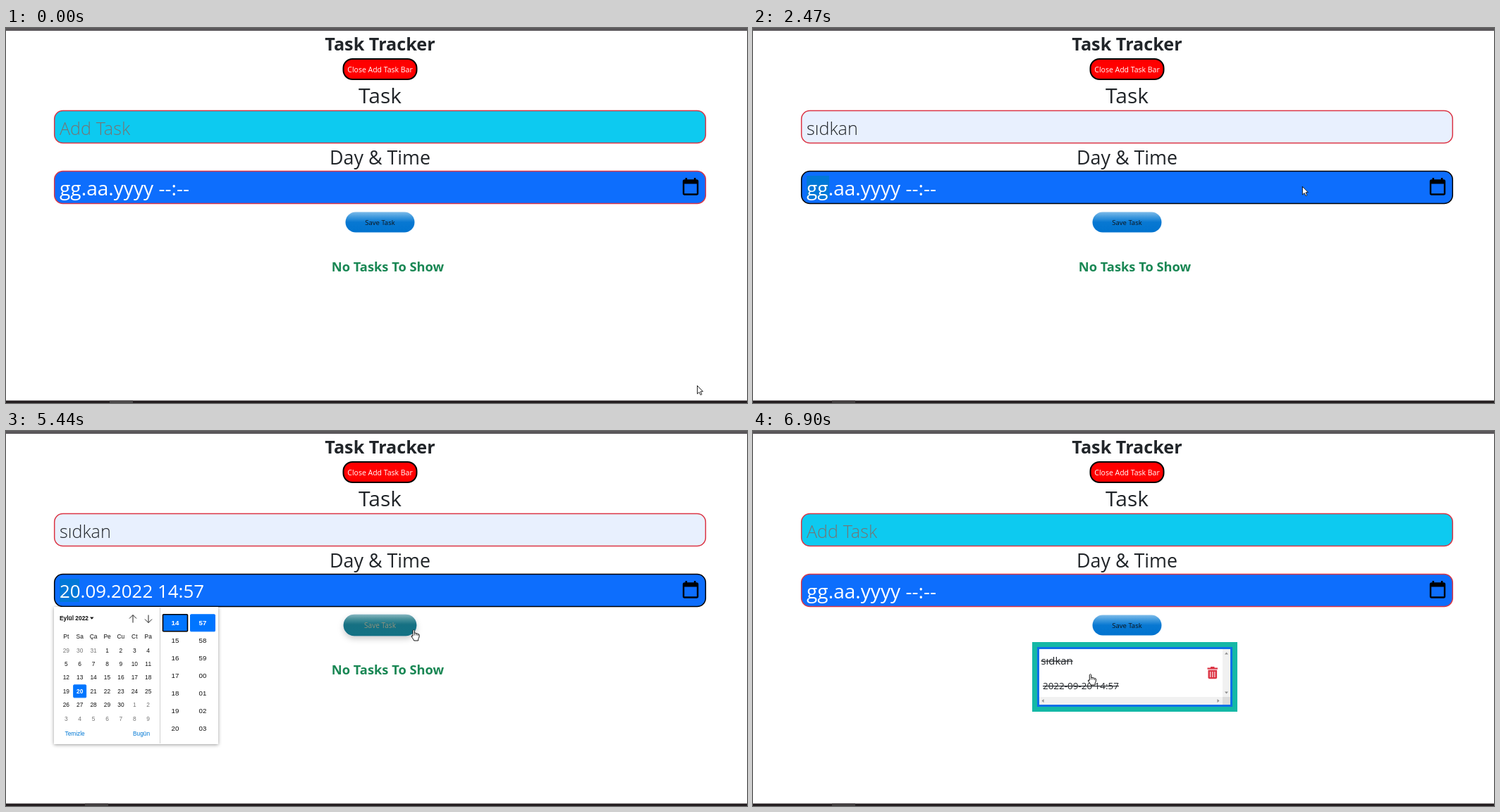
Write an HTML page with a canvas that moves like this. It is 1051 by 533 pixels and loops after 8 s.

```html
<!DOCTYPE html>
<html lang="tr">
<head>
<meta charset="utf-8">
<title>Task Tracker</title>
<style>
html, body { margin: 0; width: 100%; height: 100%; overflow: hidden; background: #fff; }
canvas { display: block; }
</style>
</head>
<body>
<canvas id="stage" width="1051" height="533"></canvas>
<script>
const c = document.getElementById('stage').getContext('2d');
const LOOP = 8000, MID = 530.5;
const SANS = '"Open Sans", "Noto Sans", sans-serif', ARIAL = '"Liberation Sans", Arial, sans-serif';
const INK = '#212529', RED = '#dc3545', BLUE = '#0d6efd';
const NAME = 'sıdkan';

// Bursts of movement: start, end, number of steps
const bursts = [[70, 860, 12], [1120, 1920, 12], [2000, 2740, 12], [2820, 2890, 2],
  [3290, 4090, 13], [4160, 4900, 12], [4980, 5710, 12], [6340, 6690, 6]];

// Pointer path: time, x, y
const path = [[70, 980, 508], [500, 640, 210], [715, 440, 105], [860, 369, 128],
  [1120, 369, 128], [1260, 222, 142], [1411, 179, 175], [1600, 158, 186],
  [2000, 158, 188], [2250, 460, 234], [2471, 779, 225], [2740, 996, 215],
  [2820, 992, 222], [2890, 981, 233], [3290, 979, 236], [3690, 346, 272],
  [4090, 193, 313], [4160, 188, 316], [4430, 106, 364], [4530, 106, 364],
  [4760, 240, 268], [4900, 286, 275], [4980, 292, 275], [5445, 578, 282],
  [5710, 547, 291], [6340, 547, 291], [6690, 478, 345]];

const between = (t, a, b) => t >= a && t < b;
const clamp = x => Math.max(0, Math.min(1, x));

function stepped(t) {
  for (const [a, b, n] of bursts) {
    if (t < a || t > b) continue;
    const d = (b - a) / (n - 1);
    return Math.min(b, a + Math.floor((t - a) / d + 0.3) * d);
  }
  return t;
}

function pointerAt(t) {
  const i = path.findIndex(p => p[0] > t);
  if (i === 0) return path[0].slice(1);
  if (i < 0) return path[path.length - 1].slice(1);
  const [a, x, y] = path[i - 1], [b, u, v] = path[i], k = (t - a) / (b - a);
  return [x + (u - x) * k, y + (v - y) * k];
}

function rect(x, y, w, h, color) {
  c.fillStyle = color;
  c.fillRect(x, y, w, h);
}

function round(x, y, w, h, r, fill, stroke, line = 1.5) {
  c.beginPath();
  c.roundRect(x, y, w, h, r);
  if (fill) { c.fillStyle = fill; c.fill(); }
  if (stroke) { c.strokeStyle = stroke; c.lineWidth = line; c.stroke(); }
}

function poly(points, fill, stroke, line = 1) {
  c.beginPath();
  for (let i = 0; i < points.length; i += 2) c.lineTo(points[i], points[i + 1]);
  if (fill) { c.closePath(); c.fillStyle = fill; c.fill(); }
  if (stroke) { c.strokeStyle = stroke; c.lineWidth = line; c.stroke(); }
}

function text(s, x, y, size, color, { weight = 400, align = 'left', family = SANS } = {}) {
  c.font = `${weight} ${size}px ${family}`;
  c.textAlign = align;
  c.fillStyle = color;
  c.fillText(s, x, y);
  return c.measureText(s).width;
}

function page(t) {
  rect(0, 0, 1051, 533, '#fff');
  rect(0, 0, 1051, 4, '#5a575a');
  rect(0, 529.5, 1051, 3.5, '#241e20');
  if (t < 790) rect(147, 529.5, 33, 3.5, '#4b4849');
  else rect(112, 529.5, 33, 3.5, '#413d3e');

  const mid = { align: 'center' }, bold = { align: 'center', weight: 700 };
  text('Task Tracker', MID, 32, 25.2, INK, bold);
  round(478.5, 44, 104, 29, 13, '#f00', '#000', 2);
  text('Close Add Task Bar', MID, 62.5, 10.5, '#fff', mid);
  text('Task', MID, 107, 30, INK, mid);
  text('Day & Time', MID, 194, 26.8, INK, mid);
  if (t < 5790) text('No Tasks To Show', 541.5, 345.5, 18.3, '#198754', bold);
}

function taskField(t) {
  const filled = between(t, 1470, 5790);
  const focus = between(t, 780, 2300);
  round(68.7, 117.5, 923.6, 46, 12, filled ? '#e8f0fe' : '#0dcaf0', focus ? '#000' : RED);
  text(filled ? NAME : 'Add Task', 76, 151.5, 25.2, filled ? INK : '#757575', { weight: 300 });
}

function dateField(t) {
  const focus = between(t, 2300, 5790), chosen = between(t, 4430, 5790);
  round(68.7, 203.5, 923.6, 46, 12, BLUE, focus ? '#000' : RED);
  if (focus) rect(76, 210, chosen ? 28 : 32, 33, '#0178d7');
  if (chosen) text('20.09.2022 14:57', 76, 237, 25.9, '#fff');
  else text('gg.aa.yyyy --:--', 76, 238, 28, '#fff');
  round(961, 216.5, 20, 20, 1.5, null, '#000', 2.4);
  rect(961, 216, 20, 5.5, '#000');
  rect(963.5, 213, 2.6, 4, '#000');
  rect(975.8, 213, 2.6, 4, '#000');
}

function pill(stops) {
  const g = c.createLinearGradient(0, -14.5, 0, 14.5);
  stops.forEach(([at, color]) => g.addColorStop(at, color));
  round(-49, -14.5, 98, 29, 14.5, g);
}

function saveButton(t) {
  const hover = clamp((t - 5300) / 250) - clamp((t - 6400) / 250);
  const scale = 1 + 0.1 * hover;
  c.save();
  c.translate(MID, 276);
  c.scale(scale, scale);
  c.shadowColor = `rgba(0,0,0,${0.35 * hover})`;
  c.shadowBlur = 9;
  c.shadowOffsetY = 4;
  pill([[0, '#7dbbe9'], [0.25, '#3d98dd'], [0.5, '#0878d2'], [1, '#0073cf']]);
  c.shadowColor = 'transparent';
  c.globalAlpha = hover;
  pill([[0, '#8fb3a1'], [0.2, '#4f8a6c'], [0.45, '#1f6a49'], [1, '#22714d']]);
  c.globalAlpha = 1;
  const mix = (a, b) => a + (b - a) * hover;
  text('Save Task', 0, 3.6, 9.5, `rgb(${mix(16, 240)},${mix(20, 240)},${mix(24, 200)})`, { align: 'center' });
  c.restore();
}

function suggestions(t) {
  if (!between(t, 1255, 1850)) return;
  c.save();
  c.shadowColor = 'rgba(0,0,0,.35)';
  c.shadowBlur = 3;
  c.shadowOffsetY = 1;
  round(137, 170, 58, 155, 3, '#292a2d');
  c.restore();
  poly([145.5, 170.5, 151.5, 164.5, 157.5, 170.5], '#292a2d');
  if (t >= 1470) rect(137, 173, 58, 25, '#3f4043');
  [NAME, 'asd', 'demhan', 'react', 'asda', 'asdasd'].forEach((s, i) =>
    text(s, 145, 188.3 + 25 * i, 8.4, '#fff'));
}

function cell(s, x, y, size, color, weight) {
  text(s, x, y + size * 0.36, size, color, { weight, align: 'center', family: ARIAL });
}

function picker(t) {
  if (!between(t, 3150, 5790)) return;
  const arial = { family: ARIAL };
  c.save();
  c.shadowColor = 'rgba(0,0,0,.4)';
  c.shadowBlur = 5;
  c.shadowOffsetY = 1;
  rect(68, 250, 233, 195, '#fff');
  c.restore();
  rect(218, 251, 1, 193, '#d0d0d0');

  text('Eylül 2022', 76, 269, 8.4, '#101010', { weight: 700, family: ARIAL });
  poly([119, 264.5, 124.5, 264.5, 121.75, 267.8], '#101010');
  [[180, 1], [202, -1]].forEach(([x, up]) => {
    const y = 267;
    poly([x, y + 5.5, x, y - 5.5], null, '#222');
    poly([x - 5, y - up * 0.5, x, y - up * 5.5, x + 5, y - up * 0.5], null, '#222');
  });

  const col = i => 85.3 + 19.4 * i;
  ['Pt', 'Sa', 'Ça', 'Pe', 'Cu', 'Ct', 'Pa'].forEach((s, i) => cell(s, col(i), 291.5, 8.4, '#101010'));
  for (let i = 0; i < 42; i++) {
    const n = i - 2, inside = n > 0 && n <= 30;
    const day = n < 1 ? n + 31 : inside ? n : n - 30;
    const x = col(i % 7), y = 311.5 + 19.45 * Math.floor(i / 7);
    if (n === 20) {
      const ring = t < 4750;
      round(x - 9, y - 9, 18, 18, 1, '#0075ff', ring ? '#000' : '#0075ff', ring ? 1.6 : 1);
      cell(day, x, y, 8.4, '#fff', 700);
    } else cell(day, x, y, 8.4, inside ? '#101010' : '#767676');
  }
  text('Temizle', 83.5, 433, 8.3, '#0078d4', arial);
  text('Bugün', 204, 433, 8.3, '#0078d4', { align: 'right', family: ARIAL });

  [[240, 14, 24], [279, 57, 60]].forEach(([x, first, wrap], k) => {
    for (let i = 0; i < 7; i++) {
      const y = 272.8 + 25 * i, s = String((first + i) % wrap).padStart(2, '0');
      if (!i) {
        const ring = k === 0 && t >= 4750;
        round(x - 17.5, y - 12, 35, 24, 1, '#0075ff', ring ? '#000' : '#0075ff', ring ? 1.6 : 1);
      }
      cell(s, x, y, 9.7, i ? '#101010' : '#fff', i ? 400 : 700);
    }
  });
}

function card(t) {
  if (t < 5790) return;
  const done = t >= 6830;
  if (done) rect(396, 300, 291, 99, '#14b8a6');
  rect(403, 307, 277, 85, '#0d6fe8');
  rect(406, 310, 271, 79, '#fff');
  rect(666, 310, 11, 68, '#f1f1f1');
  rect(406, 378, 260, 11, '#f1f1f1');
  rect(666, 378, 11, 11, '#dcdcdc');
  const grey = '#8f8f8f';
  poly([669, 317.5, 671.5, 314.5, 674, 317.5], grey);
  poly([669, 370.5, 671.5, 373.5, 674, 370.5], grey);
  poly([412.5, 381, 409.5, 383.5, 412.5, 386], grey);
  poly([658.5, 381, 661.5, 383.5, 658.5, 386], grey);

  const w = text(NAME, 408.5, 332, 14.9, INK);
  const v = text('2022-09-20 14:57', 411, 367, 13.45, INK);
  if (done) {
    rect(408.5, 326.5, w, 1.2, INK);
    rect(411, 362, v, 1.2, INK);
  }

  rect(644.5, 336.5, 14.5, 2.2, RED);
  rect(649, 335, 5.5, 2, RED);
  round(645.5, 339.7, 12.6, 12.6, [0, 0, 2, 2], RED);
  for (let i = 0; i < 3; i++) rect(648.2 + 3.1 * i, 342, 1, 8, '#fff');
}

function beam(x, y) {
  const color = 'rgba(190,235,245,.75)';
  poly([x, y - 5, x, y + 5], null, color);
  poly([x - 2.5, y - 5, x + 2.5, y - 5], null, color);
  poly([x - 2.5, y + 5, x + 2.5, y + 5], null, color);
}

function arrow() {
  poly([0, 0, 0, 11.5, 2.7, 9, 4.6, 13, 6.4, 12.2, 4.6, 8.3, 8, 8.1, 0, 0, 0, 1], '#fff', '#111', 0.9);
}

function hand() {
  c.beginPath();
  c.moveTo(-1.2, 9);
  c.lineTo(-1.2, 1);
  c.quadraticCurveTo(0, -1, 1.2, 1);
  c.lineTo(1.2, 5);
  c.quadraticCurveTo(2.6, 4, 3.7, 5.5);
  c.quadraticCurveTo(5, 4.6, 6, 6.2);
  c.quadraticCurveTo(7.6, 5.6, 8, 7.2);
  c.quadraticCurveTo(8.2, 11, 6.6, 13);
  c.lineTo(6.5, 15.5);
  c.lineTo(0.5, 15.5);
  c.quadraticCurveTo(-0.5, 13, -3.2, 9.5);
  c.quadraticCurveTo(-3, 7.6, -1.2, 9);
  c.fillStyle = '#fff';
  c.fill();
  c.strokeStyle = '#111';
  c.lineWidth = 1;
  c.stroke();
  poly([1.2, 5, 1.2, 8], null, '#111', 0.8);
  poly([3.7, 5.5, 3.7, 8], null, '#111', 0.8);
  poly([6, 6.2, 6, 8.5], null, '#111', 0.8);
}

function pointer(t) {
  const [x, y] = pointerAt(t);
  // faint trails left on the focused field
  if (between(t, 860, 1470)) beam(369.5, 128.5);
  if (between(t, 1255, 1470)) beam(222, 142.5);
  if (t < 1300 && y > 117 && y < 164) return beam(x + 0.5, y + 0.5);
  c.save();
  c.translate(x + 0.5, y + 0.5);
  t >= 5300 ? hand() : arrow();
  c.restore();
}

function draw(now) {
  const t = stepped(now % LOOP);
  [page, taskField, dateField, saveButton, card, suggestions, picker, pointer].forEach(part => part(t));
}

let start;
function tick(now) {
  start ??= now;
  draw(now - start);
  requestAnimationFrame(tick);
}
draw(0);
requestAnimationFrame(tick);
</script>
</body>
</html>
```
